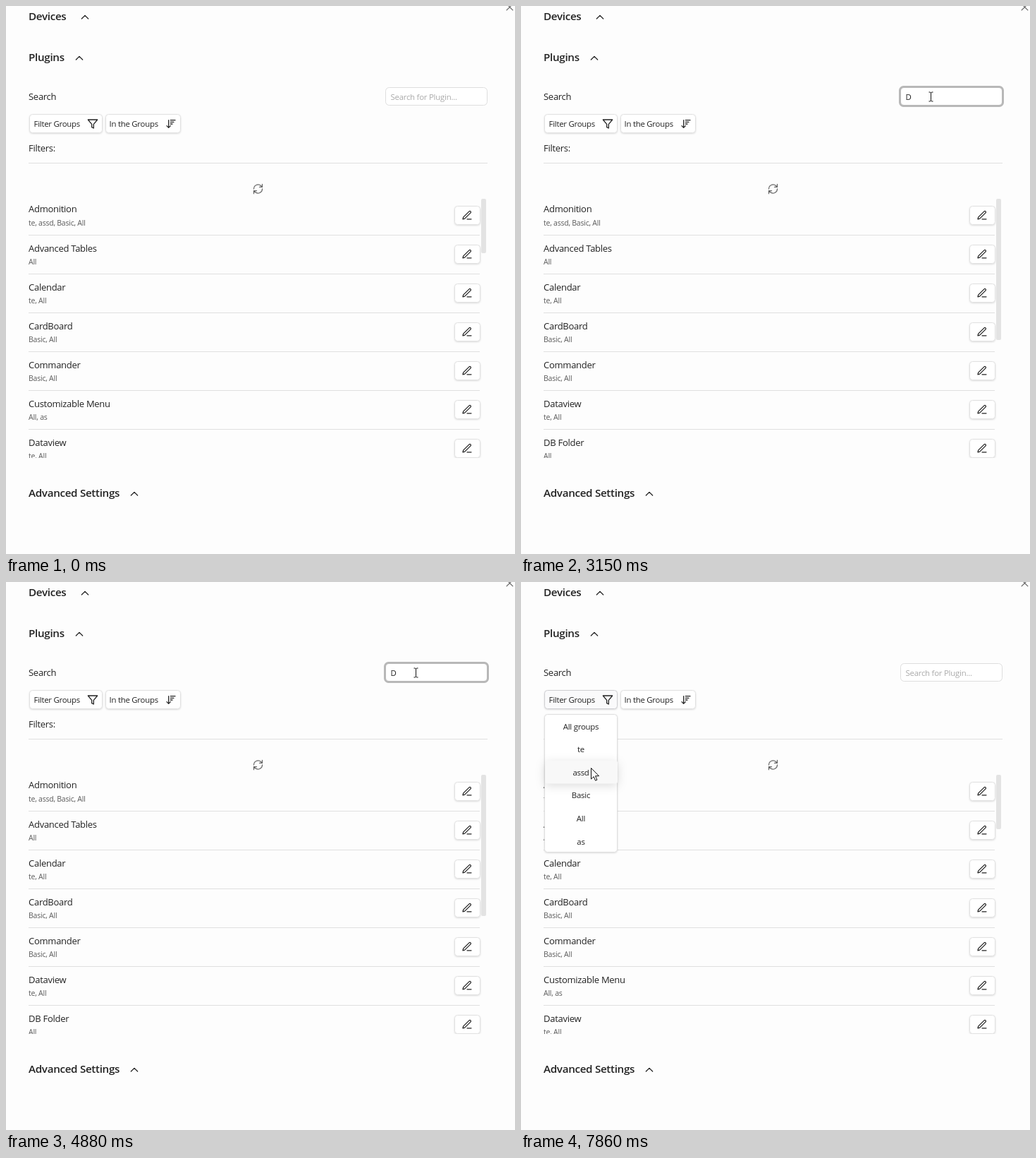
Animation, 722 px wide and 776 px high, one loop 7.99 s. Source, as an HTML page:

```html
<!DOCTYPE html>
<html lang="en">
<head>
<meta charset="utf-8">
<title>Plugin search and group filter</title>
<style>
  html, body { margin: 0; width: 100%; height: 100%; overflow: hidden; background: #fdfdfd; }
  svg { display: block; width: 722px; height: 776px; }
  text { font: 13px "Open Sans", "Noto Sans", sans-serif; letter-spacing: -.021em; fill: #222; white-space: pre; }
  .head { font-size: 15.2px; font-weight: 600; }
  .sub { font-size: 10.5px; fill: #5a5a5a; }
  .sub tspan { font-weight: 600; }
  .ui { font-size: 11.4px; }
  .hint { font-size: 11.4px; fill: #aaa; }
  .mid { text-anchor: middle; }
  .line { stroke: #e0e0e0; }
  .icon { fill: none; stroke: #222; stroke-width: 1.9; stroke-linecap: round; stroke-linejoin: round; }
  .faint { stroke: #666; }
  .btn { fill: #fff; stroke: #e1e1e1; filter: drop-shadow(0 1px 1px #0002); }
  .active { fill: #fafafb; stroke: #cfcfd2; }
  .hover { fill: #f6f6f8; stroke: #d6d6d8; }
  .field { fill: #fff; stroke: #dedede; }
  .ring { fill: none; stroke: #b8b8b8; stroke-width: 3; }
  .menu { fill: #fff; stroke: #dfdfdf; filter: drop-shadow(0 1px 1px #0002); }
  .row { fill: #f8f8f8; filter: drop-shadow(0 3px 7px #0002); }
</style>
</head>
<body>
<svg id="stage" viewBox="0 0 722 776"></svg>
<script>
const LOOP = 7990, STEP = 68;
const stage = document.getElementById('stage');

const icons = {
  edit: 'M12 20h9M16.5 3.5a2.12 2.12 0 0 1 3 3L7 19l-4 1 1-4z',
  power: 'M18.36 6.64a9 9 0 1 1-12.73 0M12 2v10',
  off: 'M18.36 6.64A9 9 0 0 1 20.77 15M6.16 6.16a9 9 0 1 0 12.68 12.68M12 2v4M2 2l20 20',
  funnel: 'M22 3H2l8 9.46V19l4 2v-8.54z',
  sort: 'M3 16l4 4 4-4M7 20V4M11 4h10M11 8h7M11 12h4',
  refresh: 'M21 2v6h-6M3 12a9 9 0 0 1 15-6.7L21 8M3 22v-6h6M21 12a9 9 0 0 1-15 6.7L3 16',
  chevron: 'M5 15l7-7 7 7',
  close: 'M5.5 5.5l13 13M18.5 5.5l-13 13'
};

const plugins = [
  ['Admonition', 'te, assd, Basic, All'],
  ['Advanced Tables', 'All'],
  ['Calendar', 'te, All'],
  ['CardBoard', 'Basic, All'],
  ['Commander', 'Basic, All'],
  ['Customizable Menu', 'All, as'],
  ['Dataview', 'te, All'],
  ['DB Folder', 'All']
];
const groups = ['All groups', 'te', 'assd', 'Basic', 'All', 'as'];

// Pointer stops: time, x, y
const pointer = [
  [130, 176, 328], [400, 575, 133], [542, 575, 133], [740, 581, 128],
  [5822, 581, 128], [6370, 141, 161], [6580, 110, 167], [6842, 110, 167],
  [7110, 112, 162], [7312, 112, 162], [7380, 113, 160], [7860, 100, 263]
];
const caretFlips = [810, 1340, 1870, 2400, 2600, 3150, 3210, 3750, 4280, 4810, 5340, 5890, 6440, 6910];

const clamp = v => Math.max(0, Math.min(1, v));
const text = (x, y, s, cls = '') => `<text x="${x}" y="${y}" class="${cls}">${s}</text>`;
const rect = (x, y, w, h, cls, r = 4) =>
  `<rect x="${x + .5}" y="${y + .5}" width="${w}" height="${h}" rx="${r}" class="${cls}"/>`;
const line = (y, right = 672) => `<path d="M32 ${y + .5}H${right}" class="line"/>`;
const icon = (name, x, y, cls = '') =>
  `<path d="${icons[name]}" class="icon ${cls}" transform="translate(${x} ${y}) scale(.667) translate(-12 -12)"/>`;
const iconButton = (name, x, y) => rect(x - 18, y - 14, 36, 26, 'btn') + icon(name, x, y - .5);
const heading = (s, y, chevronX) => text(32, y, s, 'head') + icon('chevron', chevronX, y - 4);

function pointerAt(t) {
  if (t < pointer[0][0]) return null;
  const i = pointer.findLastIndex(p => p[0] <= t);
  const [t0, x0, y0] = pointer[i];
  const [t1, x1, y1] = pointer[i + 1] || [t0 + 1, x0, y0];
  const steps = Math.max(1, Math.round((t1 - t0) / STEP));
  const u = Math.floor((t - t0) / (t1 - t0) * steps + 1e-6) / steps;
  const k = u * u * (3 - 2 * u);
  return { x: Math.round(x0 + (x1 - x0) * k), y: Math.round(y0 + (y1 - y0) * k) };
}

function queryAt(t) {
  if (t < 2600 || t >= 5080) return '';
  return t >= 3210 && t < 4880 ? 'DB' : 'D';
}

function groupRows() {
  const row = (name, y, delay) => delay === undefined
    ? text(32, y + 5, name)
    : text(32, y - 4, name) + text(32, y + 14, `<tspan>Startup:</tspan> Delayed by ${delay} seconds`, 'sub');
  return [['assd', 39, 3], ['Basic', 94, 0], ['All', 145], ['as', 197, 5]].map(([name, y, delay]) =>
    row(name, y, delay) + iconButton('power', 566, y) + iconButton('off', 610, y) + iconButton('edit', 654, y)
  ).join('') + [10, 66, 120, 168].map(y => line(y)).join('');
}

function pluginList(query) {
  const found = plugins.filter(p => p[0].toLowerCase().includes(query.toLowerCase()));
  const rows = found.map(([name, tags], i) => {
    const y = Math.floor(i * 55.1);
    return text(32, 292 + Math.ceil(i * 55.1), name) + text(32, 311 + y, tags, 'sub') +
      iconButton('edit', 654, 297 + y) + (i < found.length - 1 ? line(324 + y) : '');
  }).join('');
  const thumb = { '': 77, D: 200 }[query];
  return `<g clip-path="url(#list)">${rows}</g>` +
    (thumb ? `<rect x="674" y="273" width="7" height="${thumb}" rx="2" fill="#e3e3e3"/>` : '');
}

function searchField(t, query) {
  const focus = clamp((t - 745) / 195) * (1 - clamp((t - 6845) / 195));
  const caret = caretFlips.filter(c => c <= t).length % 2;
  const x = 546 + query.length * 7;
  return rect(538, 115, 144, 25, 'field', 5) +
    `<g opacity="${focus.toFixed(2)}">${rect(537, 114, 146, 27, 'ring', 5)}</g>` +
    text(545.5, 132.5, query || 'Search for Plugin...', query ? 'ui' : 'hint') +
    (caret ? `<path d="M${x + .5} 120v16" stroke="#222"/>` : '');
}

function groupMenu(at) {
  const hovered = at.y >= 188 ? Math.floor((at.y - 188) / 32.5) : -1;
  return rect(33, 187, 103, 195, 'menu') +
    (hovered >= 0 ? `<rect x="34" y="${188 + hovered * 32.5}" width="103" height="32.5" rx="3" class="row"/>` : '') +
    groups.map((g, i) => text(85, 208.5 + i * 32.6, g, 'ui mid')).join('');
}

function cursor({ x, y }, overField) {
  return overField
    ? `<path transform="translate(${x + .5} ${y + .5})" d="M-3-6.5h2l1 1 1-1h2M0-5.5v11M-3 6.5h2l1-1 1 1h2" fill="none" stroke="#111"/>`
    : `<path transform="translate(${x - .5} ${y})" d="M0 .5V16l3.6-3.4 2.5 5.6 2.3-1-2.4-5.5H11z" fill="#fff" stroke="#111"/>`;
}

function scene(t) {
  const query = queryAt(t), at = pointerAt(t), short = query === 'DB';
  const inBar = at && at.y >= 153 && at.y <= 180;
  const overFilter = inBar && at.x >= 33 && at.x < 139;
  const overSort = inBar && at.x >= 139 && at.x <= 248;
  const overField = at && !short && at.x >= 538 && at.x <= 683 && at.y >= 115 && at.y <= 141;

  const section =
    heading('Devices', 20, 112) + heading('Plugins', 78, 104) +
    text(32, 133, 'Search') + searchField(t, query) +
    rect(33, 153, 103, 26, `btn ${overFilter ? 'hover' : ''} ${t >= 6910 ? 'active' : ''}`) +
    text(39.5, 171, 'Filter Groups', 'ui') + icon('funnel', 123, 167) +
    rect(141, 153, 106, 26, `btn ${overSort ? 'hover' : ''}`) +
    text(146.5, 171, 'In the Groups', 'ui') + icon('sort', 234, 167) +
    text(32, 206, 'Filters:') + line(222, 683) +
    icon('refresh', 357.5, 259, 'faint') + pluginList(query);

  return '<clipPath id="list"><path d="M0 270H722V640H0z"/></clipPath>' +
    (short ? groupRows() : '') +
    `<g transform="translate(0 ${short ? 256 : 0})">${section}</g>` +
    heading('Advanced Settings', short ? 694 : 695, 182) +
    icon('close', 714.5, 1.5, 'faint') +
    (t >= 7040 ? groupMenu(at) : '') +
    (at ? cursor(at, overField) : '');
}

let shown = '';
function tick() {
  const markup = scene(performance.now() % LOOP);
  if (markup !== shown) stage.innerHTML = shown = markup;
  requestAnimationFrame(tick);
}
tick();
</script>
</body>
</html>
```
